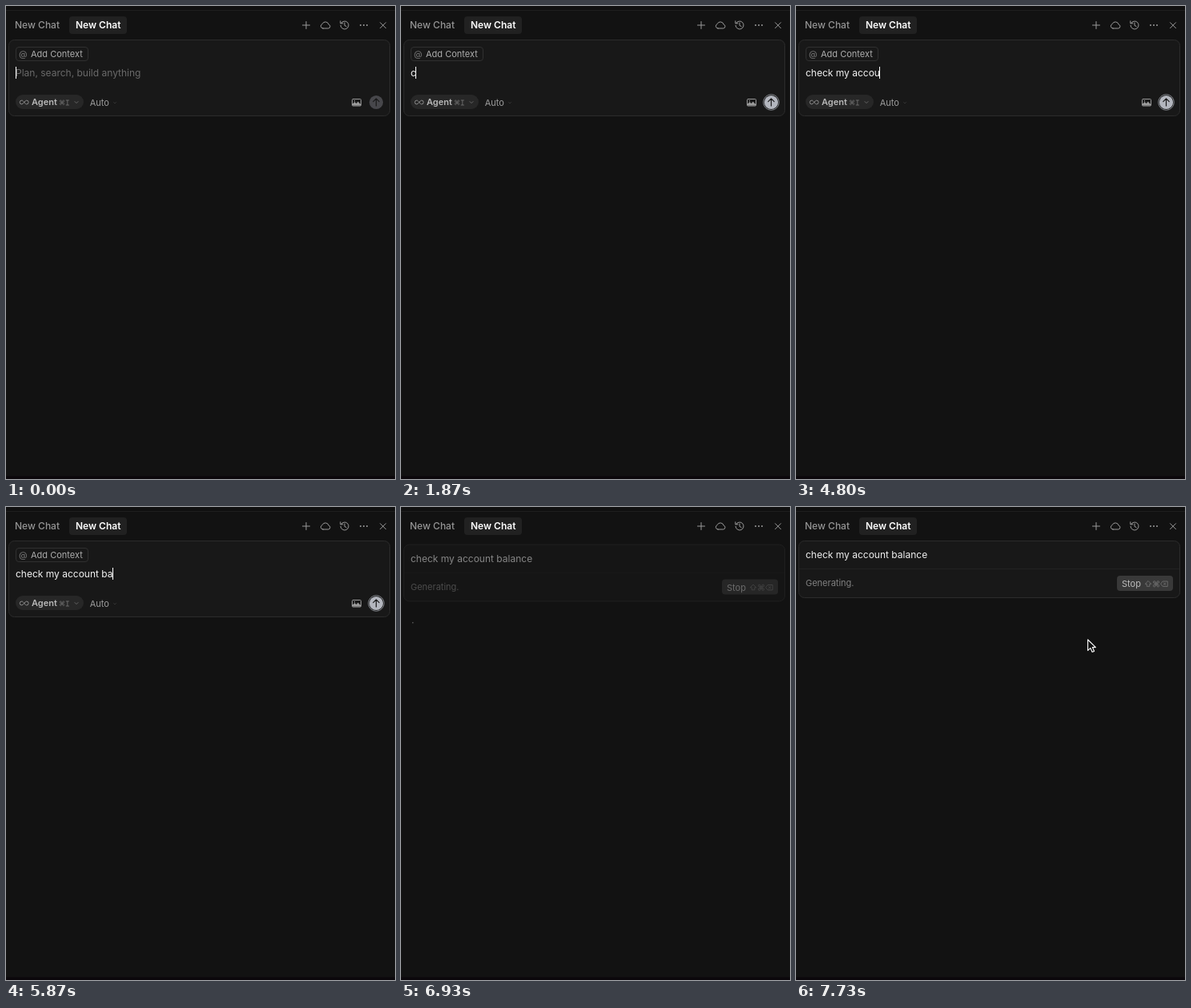
Write an HTML page that moves like this. It is 486 px wide and 592 px high and loops after 8000 ms.

```html
<!DOCTYPE html>
<html lang="en">
<head>
<meta charset="utf-8">
<title>Chat prompt</title>
<style>
  html, body { margin: 0; width: 100%; height: 100%; overflow: hidden; background: #121212; }
  svg { display: block; width: 486px; height: 592px; }
  text { font-family: Inter, "Open Sans", sans-serif; font-size: 12px; white-space: pre; }
  .small { font-size: 11px; }
  .line { fill: none; stroke: #9a9a9a; stroke-linecap: round; stroke-linejoin: round; }
  .keys { fill: none; stroke: #777; stroke-width: .8; stroke-linejoin: round; }
</style>
</head>
<body>
<svg viewBox="0 0 486 592" xmlns="http://www.w3.org/2000/svg">
  <defs>
    <path id="command" d="M3 3V1.7A1.3 1.3 0 1 0 1.7 3H6.3A1.3 1.3 0 1 0 5 1.7V6.3A1.3 1.3 0 1 0 6.3 5H1.7A1.3 1.3 0 1 0 3 6.3Z"/>
  </defs>

  <rect width="486" height="592" fill="#121212"/>
  <rect width="486" height="5" fill="#101010"/>
  <rect y="5" width="486" height="1" fill="#1f1f1f"/>
  <rect y="588.5" width="486" height="3.5" fill="#0b070b"/>

  <!-- tabs -->
  <text x="11" y="28" font-weight="500" fill="#949494">New Chat</text>
  <rect x="79" y="13" width="72" height="22" rx="4" fill="#212121"/>
  <text x="87" y="28" font-weight="600" fill="#fff">New Chat</text>

  <!-- toolbar -->
  <g class="line">
    <path d="M370.5 24h9M375 19.5v9"/>
    <path d="M396 28h6.6a2.5 2.5 0 0 0 .5-4.9a4.2 4.2 0 0 0-8-.5A2.8 2.8 0 0 0 396 28Z"/>
    <path d="M418.6 21.6a5 5 0 1 1-.6 2.6M417.8 18.8v3h3M423 21v3.3l2.2 1.3"/>
    <path d="M467.5 20.7l7 7M474.5 20.7l-7 7"/>
  </g>
  <g fill="#9a9a9a">
    <circle cx="443" cy="24" r="1"/><circle cx="447" cy="24" r="1"/><circle cx="451" cy="24" r="1"/>
  </g>

  <!-- prompt box -->
  <g id="composer">
    <rect x="3.5" y="42.5" width="476" height="95" rx="7" fill="#181818" stroke="#2c2c2c"/>
    <rect x="12.5" y="51.5" width="90" height="17" rx="3.5" fill="none" stroke="#303030"/>
    <text class="small" x="16" y="63.5" fill="#777">@</text>
    <text class="small" x="31" y="64" fill="#adadad">Add Context</text>
    <text id="hint" x="12" y="88" fill="#6a6a6a">Plan, search, build anything</text>
    <text id="typed" x="12" y="88" fill="#f4f4f4"></text>
    <rect id="caret" x="12" y="76" width="1" height="15" fill="#fff"/>

    <rect x="12" y="111" width="85" height="18" rx="9" fill="#272727"/>
    <path class="line" style="stroke:#8c8c8c" d="M22.7 120.5C21.2 118.6 20.6 118.1 19.7 118.1a2.4 2.4 0 0 0 0 4.8C21.6 122.9 23.8 118.1 25.7 118.1a2.4 2.4 0 0 1 0 4.8C24.8 122.9 24.2 122.4 22.7 120.5Z"/>
    <text class="small" x="32" y="124" font-weight="600" fill="#b8b8b8">Agent</text>
    <use href="#command" class="keys" transform="translate(66.9 117.6) scale(.78)"/>
    <path class="keys" d="M74.8 118h4M76.8 118v6M74.8 124h4"/>
    <path class="line" style="stroke:#666" d="M86 119.6l2 2l2-2"/>
    <text class="small" x="104.7" y="125" fill="#9c9c9c">Auto</text>
    <path class="line" style="stroke:#343434" d="M134.5 120.5l1.5 1.5l1.5-1.5"/>

    <rect class="line" x="432.5" y="116.5" width="11" height="8.5" rx="1"/>
    <path d="M433 124.5v-2l2.6-2.6l2 2l2.2-2.2l3.2 3.2v1.6z" fill="#9a9a9a"/>
    <circle cx="435.4" cy="118.7" r=".8" fill="#9a9a9a"/>
    <circle id="ring" cx="462.5" cy="120.5" r="9.8" fill="none" stroke="#85888e"/>
    <circle id="send" cx="462.5" cy="120.5" r="8.6"/>
    <path d="M462.5 125v-9M458.8 119.6l3.7-3.7l3.7 3.7" fill="none" stroke="#1a1a1a" stroke-width="1.2" stroke-linecap="round" stroke-linejoin="round"/>
  </g>

  <!-- sent message -->
  <g id="sent">
    <rect x="3.5" y="42.5" width="476" height="71" rx="7" fill="#181818" stroke="#2c2c2c"/>
    <path d="M4 77.5h475" stroke="#222"/>
    <text x="12" y="64" fill="#f0f0f0">check my account balance</text>
    <text id="status" class="small" x="12" y="99" fill="#808080"></text>
    <rect x="401" y="86" width="70" height="19" rx="4" fill="#393939"/>
    <text class="small" x="407" y="100" fill="#bcbcbc">Stop</text>
    <g class="keys">
      <path d="M440 92.5l-3.8 3.8h2v3h3.6v-3h2z"/>
      <use href="#command" transform="translate(446 92.3)"/>
      <path d="M464.2 93v6.4h-6l-2.6-3.2l2.6-3.2zM459.2 94.8l2.8 2.8M462 94.8l-2.8 2.8"/>
    </g>
  </g>
  <rect id="speck" x="14" y="144" width="1.5" height="1.5" fill="#555"/>

  <path id="pointer" d="M.6 1V14.6L3.8 11.6L6.1 16.5L8.6 15.4L6.4 10.6H10.4Z" fill="#111" stroke="#fff" stroke-width="1.1" stroke-linejoin="round"/>
</svg>
<script>
  const LOOP = 8000, SENT = 6930, SETTLED = 7200;
  const MESSAGE = "check my account balance";

  // [start time, value]; each value holds until the next one
  const TYPING = [[0, 0], [1870, 1], [2130, 3], [2670, 5], [2930, 6], [3200, 7], [3470, 8], [3730, 9],
    [4270, 10], [4530, 12], [4800, 14], [5070, 16], [5330, 17], [5870, 19], [6130, 21], [6400, 22], [6670, 24]];
  const CARET = [[0, true], [530, false], [1070, true], [1600, false], [1870, true]];
  const POINTER = [[0, null], [270, [160, 18]], [530, [222, 240]], [800, [186, 113]], [1330, null],
    [7470, [478, 150]], [7730, [364, 165]]];
  const DOTS = [[0, "."], [7470, ""], [7730, "."]];

  const el = id => document.getElementById(id);
  const parts = {};
  for (const id of ["composer", "hint", "typed", "caret", "ring", "send", "sent", "status", "speck", "pointer"])
    parts[id] = el(id);

  const at = (track, t) => track.reduce((held, [start, value]) => t >= start ? value : held, null);
  const show = (node, on) => node.setAttribute("display", on ? "inline" : "none");
  const pen = document.createElement("canvas").getContext("2d");

  function textWidth(text) {
    pen.font = '12px Inter, "Open Sans", sans-serif';
    return pen.measureText(text).width;
  }

  function render(t) {
    const text = MESSAGE.slice(0, at(TYPING, t));
    const filled = text.length > 0;
    const sent = t >= SENT;
    const entering = sent && t < SETTLED;

    show(parts.composer, !sent);
    show(parts.hint, !filled);
    show(parts.ring, filled);
    show(parts.caret, at(CARET, t));
    parts.typed.textContent = text;
    parts.caret.setAttribute("x", 12 + Math.floor(textWidth(text)));
    parts.send.setAttribute("fill", filled ? "#b3b6be" : "#47474b");

    show(parts.sent, sent);
    show(parts.speck, entering);
    parts.sent.setAttribute("opacity", entering ? 0.52 : 1);
    parts.sent.setAttribute("transform", `translate(0 ${entering ? 4.5 : 0})`);
    parts.status.textContent = "Generating" + at(DOTS, t);

    const spot = at(POINTER, t);
    show(parts.pointer, spot);
    if (spot) parts.pointer.setAttribute("transform", `translate(${spot})`);
  }

  const begin = performance.now();
  function tick() {
    render((performance.now() - begin) % LOOP);
    requestAnimationFrame(tick);
  }
  render(0);
  requestAnimationFrame(tick);
</script>
</body>
</html>
```
